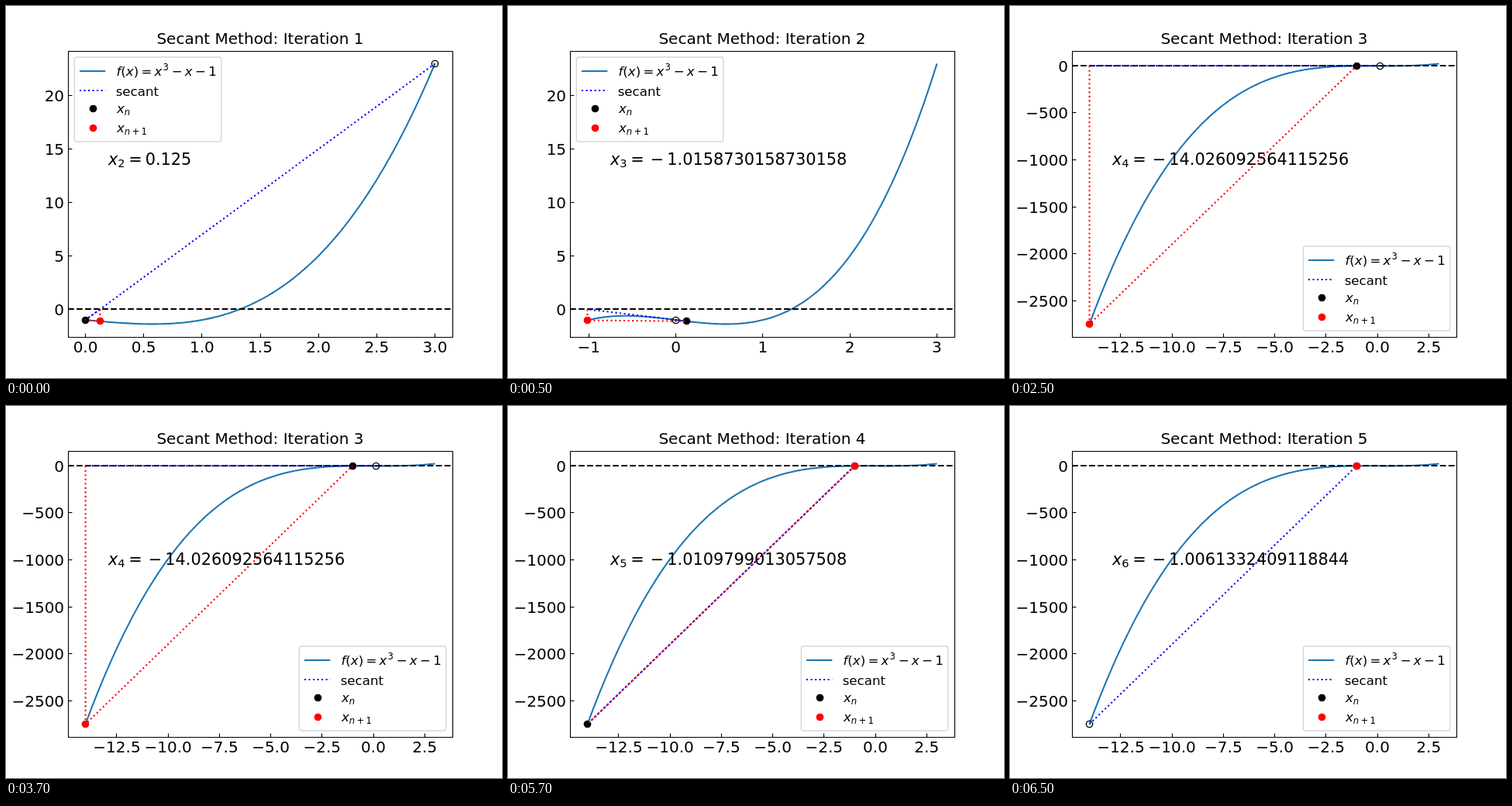
Write an HTML page that moves like this. It is 640x480 px and loops after 8000 ms.

```html
<!DOCTYPE html>
<html lang="en">
<head>
<meta charset="utf-8">
<title>Secant Method</title>
<style>
  html, body { margin: 0; width: 100%; height: 100%; overflow: hidden; background: #fff; }
  #strip { display: flex; width: 3200px; height: 480px; animation: step 8s step-end infinite; }
  svg { flex: none; width: 640px; height: 480px; display: block; }
  text { font-family: "DejaVu Sans", sans-serif; fill: #000; white-space: pre; }
  .it { font-style: italic; }
  path, circle { fill: none; stroke-width: 2.083; }
  .curve { stroke: #1f77b4; }
  .zero { stroke: #000; stroke-dasharray: 7.708 3.333; }
  .dots { stroke-dasharray: 2.083 3.4375; }
  .blue { stroke: #00f; }
  .red { stroke: #f00; }
  .axis { stroke: #000; stroke-width: 1.11; }
  circle { stroke-width: 1.389; stroke: #000; }
  circle.now { fill: #000; }
  circle.next { fill: #f00; stroke: #f00; }
  .box { fill: #fff; fill-opacity: .8; stroke: #ccc; stroke-opacity: .8; stroke-width: 1.389; }
  @keyframes step {
    0% { transform: translateX(0); }
    6.25% { transform: translateX(-640px); }
    31.25% { transform: translateX(-1280px); }
    56.25% { transform: translateX(-1920px); }
    81.25%, 100% { transform: translateX(-2560px); }
  }
</style>
</head>
<body>
<div id="strip"></div>
<script>
const values = ['3', '0', '0.125', '-1.0158730158730158', '-14.026092564115256',
  '-1.0109799013057508', '-1.0061332409118844'];
const xs = values.map(Number);
const f = x => x ** 3 - x - 1;
const minus = s => String(s).replace('-', '\u2212');
const mid = v => Math.floor(v) + 0.5;

const path = (cls, pts) =>
  `<path class="${cls}" d="M${pts.map(p => p.map(v => v.toFixed(3)).join(' ')).join('L')}"/>`;
const dot = (cls, [x, y]) => `<circle class="${cls}" cx="${mid(x)}" cy="${mid(y)}" r="4.167"/>`;
const text = (s, x, y, size, anchor = 'start', cls = '') =>
  `<text class="${cls}" x="${x}" y="${y}" font-size="${size}" text-anchor="${anchor}">${s}</text>`;

// Formula parts: [string, offset in em, rise in em]; a raised or lowered part is smaller.
const math = (parts, x, y, size) => parts.map(([s, dx, rise = 0]) =>
  text(s, x + dx * size, y - rise * size, rise ? size * 0.7 : size, 'start', /[fxn]/.test(s) ? 'it' : '')
).join('');

const SUB = -0.164, SUP = 0.383;
const formula = [['f', 0], ['(', 0.352], ['x', 0.742], [')', 1.334], ['=', 1.919], ['x', 2.952],
  ['3', 3.608, SUP], ['\u2212', 4.275], ['x', 5.308], ['\u2212', 6.095], ['1', 7.128]];
const current = [['x', 0], ['n', 0.592, SUB]];
const following = [...current, ['+', 1.172, SUB], ['1', 1.895, SUB]];

function result(n) {
  const v = values[n], head = [['x', 0], [String(n), 0.592, SUB], ['=', 1.259]];
  const tail = v[0] === '-' ? [['\u2212', 2.487], [v.slice(1), 3.52]] : [[v, 2.292]];
  return math([...head, ...tail], 132, 205, 20.833);
}

function legend(dx, dy) {
  const size = 16.667;
  return `<g transform="translate(${dx} ${dy})">
    <rect class="box" x="88.33" y="66" width="189.5" height="109" rx="3.33"/>`
    + path('curve', [[95, 84], [128.33, 84]])
    + path('dots blue', [[95, 109], [128.33, 109]])
    + dot('now', [112, 132]) + dot('next', [112, 157])
    + math(formula, 142.4, 89.5, size)
    + text('secant', 141.7, 115.5, size)
    + math(current, 143, 138, size)
    + math(following, 143, 163, size) + '</g>';
}

const range = (from, to, by) =>
  Array.from({ length: Math.round((to - from) / by) + 1 }, (_, i) => from + i * by);

function panel(step) {
  const n = step + 1;
  const seen = xs.slice(0, n + 1);
  const lo = Math.min(...seen), hi = 3;
  const bottom = Math.min(f(lo), f(Math.sqrt(1 / 3))), top = f(hi);
  const px = x => 102.545 + 450.91 * (x - lo) / (hi - lo);
  const py = y => 410.4 - 336 * (y - bottom) / (top - bottom);
  const at = (x, y = f(x)) => [px(x), py(y)];
  const [prev, now, next] = xs.slice(n - 2, n + 1);
  const wide = step > 2;
  const xt = wide ? range(-12.5, 2.5, 2.5) : step === 1 ? range(0, 3, 0.5) : range(-1, 3, 1);
  const yt = wide ? range(-2500, 0, 500) : range(0, 20, 5);
  const zero = Math.round(py(0));

  let out = path('curve', range(0, 200, 1).map(i => at(lo + (hi - lo) * i / 200)))
    + path('zero', [[80, zero], [576, zero]])
    + path('dots blue', [at(prev), at(now), at(next, 0)])
    + dot('prev', at(prev)) + dot('now', at(now))
    + path('dots red', [at(next, 0), at(next), at(now)])
    + dot('next', at(next));

  for (const t of xt) {
    const x = px(t), c = mid(x);
    out += path('axis', [[c, 427.5], [c, 422.6]])
      + text(minus(step === 2 ? t : t.toFixed(1)), x, 447, 20, 'middle');
  }
  for (const t of yt) {
    const y = py(t), c = mid(y);
    out += path('axis', [[80.5, c], [85.4, c]])
      + text(minus(t), 75.1, Math.round(y + 7.5), 20, 'end');
  }
  out += path('axis', [[80.5, 58.5], [576.5, 58.5], [576.5, 427.5], [80.5, 427.5], [80.5, 57.95]])
    + result(n)
    + text('Secant Method: Iteration ' + step, 328, 49, 20, 'middle')
    + (wide ? legend(290, 244) : legend(0, 0));
  return `<svg viewBox="0 0 640 480">${out}</svg>`;
}

document.getElementById('strip').innerHTML = [1, 2, 3, 4, 5].map(panel).join('');
</script>
</body>
</html>
```
